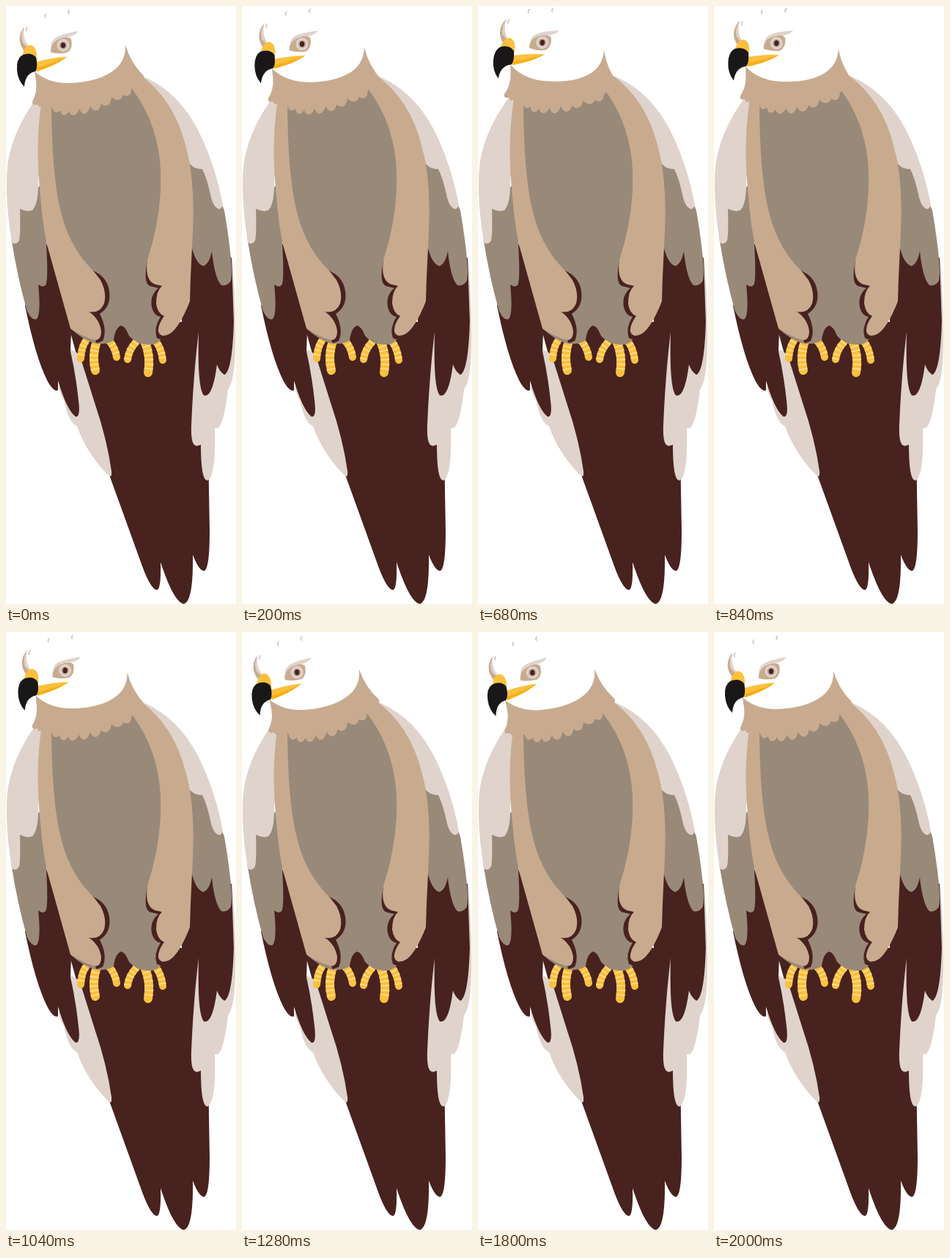
These frames come from a looping animation (314x814 px, 2040 ms). An HTML page:

```html
<!DOCTYPE html>
<html lang="en">
<head>
<meta charset="utf-8">
<title>Perched eagle</title>
<style>
html, body { margin: 0; width: 100%; height: 100%; overflow: hidden; background: #fff; }
svg { display: block; width: 314px; height: 814px; }
.dark { fill: #48221f; }
.taupe { fill: #998979; }
.tan { fill: #c8ab8f; }
.pale { fill: #dfd3cc; }
.fleck { fill: #d5cccd; }
.toes, .bands { fill: none; stroke: #fcc03c; stroke-width: 10; stroke-linecap: round; }
.bands { stroke: #fde09a; stroke-linecap: butt; stroke-dasharray: 1.6 4.6; stroke-dashoffset: -7; }
.thick { stroke-width: 12; }
</style>
</head>
<body>
<svg viewBox="0 0 314 814">
  <defs>
    <path id="toes" d="M109 456Q103 464 102 480M140 455Q149 464 151 478M178 457Q168 467 166 481M203 455Q212 464 214 482"/>
    <path id="midtoes" d="M124 456Q117 476 122 496M189 456Q198 476 194 499"/>
    <path id="fleck" d="M2-3C-3-3-3 3 1 4Q-1 0 2-3Z"/>
  </defs>

  <!-- tail and lower feathers -->
  <path class="dark" d="M84 430L142 641L184 757Q197 794 206 795Q212 794 211 757Q229 812 243 814Q256 810 255 747Q263 768 270 769Q278 768 278 715L276 600L262 430Z"/>
  <path class="pale" d="M87 469L72 520Q77 535 79 536Q85 567 97 572Q110 609 140 639Q145 643 144 633Q138 590 121 540L103 483Q99 470 89 468Z"/>
  <path class="pale" d="M309 345Q313 400 313 430Q315 508 303 522Q298 566 290 574L285 575Q287 640 275 646Q266 646 266 597Q261 600 258 598Q252 595 253 570Q256 500 263 444Z"/>

  <!-- left wing -->
  <path class="dark" d="M26 408Q41 482 58 513Q66 526 71 523L71 510Q83 550 95 559Q102 560 99 537Q95 500 88 470L89 443L85 400L54 320L40 380Z"/>
  <path class="taupe" d="M7 315Q16 372 29 416Q36 429 42 426Q48 419 44 379Q50 384 54 380Q58 375 55 324L62 230L18 270Z"/>
  <path class="pale" d="M47 118Q12 163 3 210Q-3 255 8 322Q14 326 18 319Q20 309 19 276Q29 281 36 278Q45 270 44 233L60 200L60 130Z"/>

  <!-- right wing -->
  <path class="dark" d="M240 300L240 435L263 444Q261 520 270 530Q282 534 288 488Q291 497 298 502Q309 497 311 430L308 343Z"/>
  <path class="taupe" d="M240 200L254 330Q260 352 270 354Q278 350 281 334Q285 371 294 380Q302 382 307 374Q311 355 298 278L270 215Z"/>
  <path class="pale" d="M179 93Q238 113 269 183Q288 226 296 271Q293 279 288 275Q283 272 280 261Q275 236 268 222Q257 222 250 214L225 205Z"/>

  <use href="#toes" class="toes"/>
  <use href="#toes" class="bands"/>
  <use href="#midtoes" class="toes thick"/>
  <use href="#midtoes" class="bands thick"/>

  <!-- breast -->
  <path class="taupe" d="M55 125L60 250L89 440Q105 454 120 459Q137 462 147 455Q149 438 157 435Q163 436 168 449Q179 462 198 461Q208 460 215 450L205 346L225 220L182 105Z"/>
  <path class="dark" d="M118 360Q138 368 141 388Q144 409 128 419Q139 440 132 456L124 459L108 430L100 380ZM193 346Q187 376 196 381L208 384Q196 394 199 410Q202 422 211 423Q201 438 206 452L214 455L222 447L235 400Z"/>
  <path class="tan" d="M49 126Q39 190 47 260Q50 298 56 325L88 439Q104 450 122 455Q130 454 130 443Q128 426 113 416Q128 419 134 405Q138 390 129 373Q122 363 112 353Q84 322 74 276Q62 227 62 125Z"/>
  <path class="tan" d="M165 104Q203 148 210 210Q216 275 193 346Q189 374 204 379L213 381Q205 388 205 405Q207 419 216 422Q207 434 208 443Q211 452 222 447Q236 440 251 402L252 370L255 308Q258 235 246 193Q230 127 182 93Z"/>

  <g id="head">
    <path fill="#fff" d="M28 28Q70-10 120 5L163 53L150 95L85 108L42 98L24 65Z"/>
    <path class="tan" d="M163 53Q170 77 188 95Q191 101 182 102Q172 108 171 113C171 123 165 124 160 121C157 130 149 129 144 124C143 136 136 138 130 133C127 146 119 144 115 136C111 150 104 149 100 140C96 151 88 151 86 143C82 151 75 150 74 142Q66 149 63 138Q58 132 51 134Q46 141 43 134Q35 136 36 130Q43 117 41 103L39 89Q57 105 85 105Q121 104 142 91Q164 78 163 53Z"/>
    <path class="tan" d="M25 28Q17 38 19 49Q21 57 25 61L30 54Q21 43 25 28Z"/>
    <path class="pale" d="M25 28Q19 40 23 50L28 55L30 54Q22 43 25 28Z"/>
    <path class="tan" d="M61 63Q60 51 70 46Q84 39 89 45Q92 57 84 63Q73 66 61 63Z"/>
    <path class="pale" d="M61 55Q62 45 72 41Q82 37 99 34Q93 42 84 42Q68 43 61 55Z"/>
    <circle class="pale" cx="78" cy="53.5" r="8.5"/>
    <circle cx="78" cy="53.5" r="5.3" fill="#bfa698"/>
    <ellipse class="dark" cx="78" cy="53.5" rx="3.2" ry="3.8"/>
    <path fill="#fcc03c" d="M22 70Q24 55 33 53Q42 55 42 69L42 76Q64 70 83 69Q70 80 42 89L32 84Z"/>
    <path fill="#f8ae17" d="M83 69Q70 80 42 89L42 84Q65 78 83 69Z"/>
    <path fill="#191717" d="M22 67Q34 62 41 70Q44 83 40 89Q26 92 25 110Q16 101 15 87Q14 72 22 67Z"/>
    <g class="fleck">
      <use href="#fleck" x="54" y="13"/>
      <use href="#fleck" x="86" y="7.5"/>
      <use href="#fleck" x="28.5" y="31"/>
    </g>
  </g>
</svg>
<script>
const LOOP = 2040, STEP = 40;
// time, angle, angular speed
const keys = [[0, 0, .011], [570, 8.2, 0], [1580, -5.2, 0], [2000, 0, .011]];
const head = document.getElementById('head');

function angleAt(t) {
  const i = keys.findIndex(k => k[0] > t);
  if (i < 0) return 0;
  const [t0, a0, v0] = keys[i - 1], [t1, a1, v1] = keys[i];
  const d = t1 - t0, u = (t - t0) / d;
  return a0 + (a1 - a0) * u * u * (3 - 2 * u)
    + d * u * (1 - u) * (v0 * (1 - u) - v1 * u);
}

function draw() {
  const t = Math.floor(performance.now() % LOOP / STEP) * STEP;
  head.setAttribute('transform', `rotate(${angleAt(t)} 110 124)`);
  requestAnimationFrame(draw);
}
draw();
</script>
</body>
</html>
```
